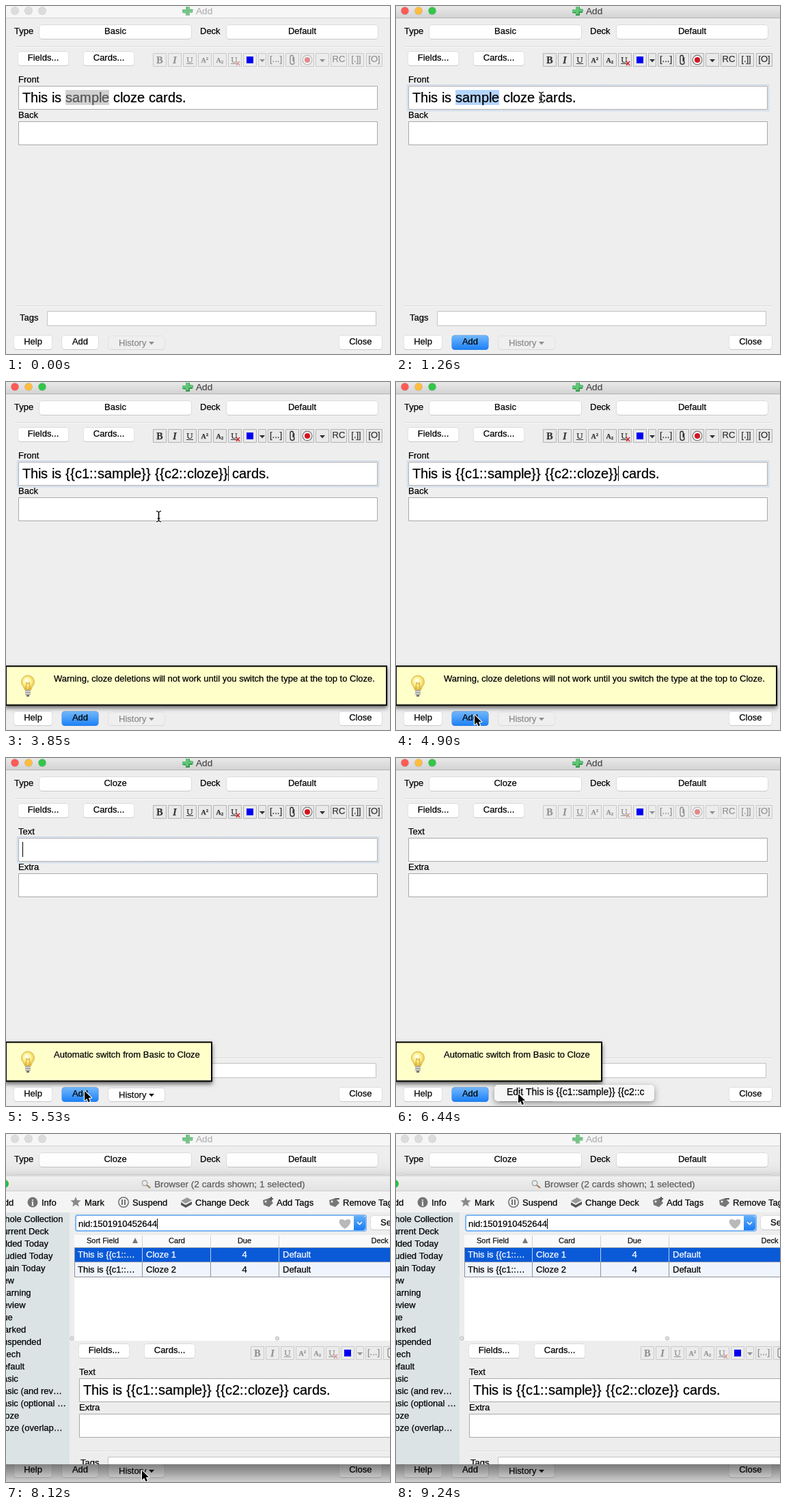
Animation, 562 px wide and 510 px high, one loop 9310 ms. Source, as an HTML page with a canvas:

```html
<!DOCTYPE html>
<html lang="en">
<head>
<meta charset="utf-8">
<title>Add cloze cards</title>
<style>
html, body { margin: 0; width: 100%; height: 100%; overflow: hidden; background: #eee; }
canvas { display: block; width: 562px; height: 510px; }
</style>
</head>
<body>
<canvas id="stage"></canvas>
<script>
const W = 562, H = 510, LOOP = 9310, STEP = 70;
const SANS = '"Liberation Sans", Arial, sans-serif';
const SERIF = '"Liberation Serif", serif';
const canvas = document.getElementById('stage');
const c = canvas.getContext('2d');
const ratio = window.devicePixelRatio || 1;
canvas.width = W * ratio;
canvas.height = H * ratio;

// Moments of the story, in ms
const T = {
  active: 490, cloze1: 2100, pick: 2730, cloze2: 3150, added: 5040,
  menu: 6160, menuEnd: 6650, browser: 7000, loaded: 7350, tipEnd: 8050, leave: 8890
};
const POINTER = [
  [0, 212, 134], [2310, 212, 134], [2660, 243, 134], [3150, 243, 134],
  [3780, 223, 197], [4060, 223, 197], [4830, 115, 488], [5740, 115, 488],
  [6090, 179, 492], [6440, 179, 492], [6650, 199, 493], [8680, 199, 493], [8890, 206, 512]
];

function pointerAt(t) {
  for (let i = 1; i < POINTER.length; i++) {
    const [t0, x0, y0] = POINTER[i - 1], [t1, x1, y1] = POINTER[i];
    if (t < t1) {
      const p = (t - t0) / (t1 - t0), e = p * p * (3 - 2 * p);
      return [x0 + (x1 - x0) * e, y0 + (y1 - y0) * e];
    }
  }
  return POINTER[POINTER.length - 1].slice(1);
}

// Drawing helpers
function rect(x, y, w, h, fill) {
  c.fillStyle = fill;
  c.fillRect(x, y, w, h);
}
function box(x, y, w, h, fill, line) {
  rect(x, y, w, h, fill);
  c.strokeStyle = line;
  c.lineWidth = 1;
  c.strokeRect(x + .5, y + .5, w - 1, h - 1);
}
function rounded(x, y, w, h, r, fill) {
  c.beginPath();
  c.roundRect(x, y, w, h, r);
  c.fillStyle = fill;
  c.fill();
}
function disc(x, y, r, fill) {
  c.beginPath();
  c.arc(x, y, r, 0, 7);
  c.fillStyle = fill;
  c.fill();
}
function poly(points, fill, line, width = 1) {
  c.beginPath();
  for (let i = 0; i < points.length; i += 2) c.lineTo(points[i], points[i + 1]);
  if (fill) { c.closePath(); c.fillStyle = fill; c.fill(); }
  if (line) { c.strokeStyle = line; c.lineWidth = width; c.stroke(); }
}
// A hairline outline gives the slightly heavy look of smoothed type
function text(s, x, y, color = '#000', size = 13, align = 'left', font = SANS, style = '') {
  c.font = `${style} ${size}px ${font}`;
  c.textAlign = align;
  c.fillStyle = c.strokeStyle = color;
  c.lineWidth = .25;
  c.lineJoin = 'round';
  c.fillText(s, x, y);
  c.strokeText(s, x, y);
}
function vertical(y0, y1, a, b) {
  const g = c.createLinearGradient(0, y0, 0, y1);
  g.addColorStop(0, a);
  g.addColorStop(1, b);
  return g;
}
function shifted(x, y, draw) {
  c.save();
  c.translate(x, y);
  draw();
  c.restore();
}
function shadow(color, blur, y) {
  c.shadowColor = color;
  c.shadowBlur = blur * ratio;
  c.shadowOffsetY = y * ratio;
}
function down(x, y, color) {
  poly([x - 4, y - 2, x + 4, y - 2, x, y + 2.5], color);
}

function button(x, y, w, h, label, blue, color = '#000') {
  rounded(x - .5, y - .5, w + 1, h + 1.5, 4.5, blue ? '#2f7fdc' : '#c9c9c9');
  rounded(x, y, w, h, 4, blue ? vertical(y, y + h, '#72b7fa', '#1e82f8') : '#fff');
  if (label) text(label, x + w / 2, y + 13, color, 13, 'center');
}

function plusIcon(dim) {
  c.globalAlpha = dim ? .55 : 1;
  poly([263, 1, 269, 1, 269, 4, 274, 5, 273, 10, 269, 10, 269, 14, 263, 14, 263, 11, 258, 10, 258, 5, 263, 5], '#2f9a48');
  poly([263, 1, 268, 1, 268, 5, 273, 5, 273, 8, 268, 8, 267, 12, 263, 12, 263, 9, 258, 9, 258, 5, 263, 5], '#62c47a');
  c.globalAlpha = 1;
}

function titleBar(active) {
  rect(0, 0, W, 17, active ? vertical(0, 17, '#e9e9e9', '#d3d3d3') : '#f6f6f6');
  rect(0, 17, W, 1, active ? '#b4b4b4' : '#d4d4d4');
  ['#fc5b57', '#fdbc40', '#34c649'].forEach((color, i) => {
    disc(13 + 20 * i, 7, 6, active ? 'rgba(0,0,0,.16)' : '#cfcfcf');
    disc(13 + 20 * i, 7, 5.5, active ? color : '#dcdcdc');
  });
  plusIcon(!active);
  text('Add', 278, 12, active ? '#4a4a4a' : '#b2b2b2', 13.6);
}

function formatBar(enabled) {
  const ink = enabled ? '#333' : '#929292';
  const edges = [215, 20, 237, 20, 259, 20, 281, 20, 303, 20, 325, 20, 347, 20, 369, 12,
    383, 24, 409, 20, 431, 20, 453, 20, 475, 24, 501, 23, 527, 24];
  for (let i = 0; i < edges.length; i += 2)
    box(edges[i], 69, edges[i + 1], 20, enabled ? '#e9e9e9' : '#ececec', enabled ? '#b3b3b3' : '#cacaca');
  const serif = (s, x, y, size, style) => text(s, x, y, ink, size, 'center', SERIF, style);
  serif('B', 225, 84, 14, 'bold');
  serif('I', 247, 84, 14, 'italic bold');
  serif('U', 269, 83, 13, '');
  rect(264, 84, 10, 1, ink);
  serif('A', 289, 83, 10, 'bold');
  serif('2', 294.5, 79, 7, 'bold');
  serif('A', 311, 83, 10, 'bold');
  serif('2', 316.5, 84, 7, 'bold');
  serif('U', 334, 83, 13, '');
  rect(329, 84, 9, 1, ink);
  const red = enabled ? '#d3232b' : '#dc9a9c';
  poly([337, 81, 342, 87], null, red, 1.5);
  poly([342, 81, 337, 87], null, red, 1.5);
  rect(352, 74, 10, 10, '#0000f0');
  down(375, 80, ink);
  text('[...]', 395, 82, ink, 13, 'center');
  c.strokeStyle = ink;
  c.lineWidth = 1.4;
  c.beginPath();
  c.moveTo(421.5, 75);
  c.lineTo(421.5, 82);
  c.arc(419, 82.5, 3, 0, Math.PI);
  c.lineTo(416, 75);
  c.arc(418.2, 74.5, 2.2, Math.PI, 0);
  c.lineTo(420, 81);
  c.stroke();
  disc(441, 79, 7.5, enabled ? '#777' : '#bbb');
  disc(441, 79, 6.3, '#f2f2f2');
  disc(441, 79, 4, enabled ? '#d4141c' : '#e08a8c');
  down(463, 80, ink);
  text('RC', 487, 82, ink, 13, 'center');
  text('[.]]', 512.5, 82, ink, 13, 'center');
  text('[O]', 539, 82, ink, 13, 'center');
}

function fields(names, width, focus) {
  button(17.5, 67, 74, 20, 'Fields...');
  button(113.5, 67, 74, 20, 'Cards...');
  text(names[0], 18, 112);
  text(names[1], 18, 164);
  box(18, 117, width, 35, '#fff', '#a9a9a9');
  box(18, 169, width, 35, '#fff', '#a9a9a9');
  if (focus) {
    c.strokeStyle = '#a9c9ec';
    c.lineWidth = 1;
    c.setLineDash([2, 1]);
    c.strokeRect(16.5, 115.5, width + 3, 38);
    c.setLineDash([]);
  }
}

// The editor sets its type on whole-pixel advances
function advance(s) {
  c.font = `20px ${SANS}`;
  return [...s].reduce((sum, ch) => sum + Math.round(c.measureText(ch).width), 0);
}
function largeText(s, x, color = '#000') {
  for (const ch of s) {
    text(ch, x, 141, color, 20);
    x += advance(ch);
  }
}

// Field content as [before, selected, after]; an empty selection is a caret
function content(t) {
  if (t >= T.added) return ['', '', ''];
  if (t >= T.cloze2) return ['This is {{c1::sample}} {{c2::cloze}}', '', ' cards.'];
  if (t >= T.pick) return ['This is {{c1::sample}} ', 'cloze', ' cards.'];
  if (t >= T.cloze1) return ['This is {{c1::sample}}', '', ' cloze cards.'];
  return ['This is ', 'sample', ' cloze cards.'];
}

function fieldText(t, focus) {
  const [before, picked, after] = content(t);
  const x = 24 + advance(before), w = advance(picked);
  if (picked) rect(x, 123, w, 22, focus ? '#b4d5fe' : '#d2d2d2');
  largeText(before, 24);
  largeText(picked, x, focus ? '#000' : '#555');
  largeText(after, x + w);
  if (focus && !picked) rect(x, 123, 1, 22, '#000');
}

function bulb() {
  const g = c.createRadialGradient(30, 437, 1, 32, 440, 11);
  g.addColorStop(0, '#fffef0');
  g.addColorStop(.5, '#fdf08a');
  g.addColorStop(1, '#e3b93c');
  c.beginPath();
  c.arc(32, 439.5, 9.5, .75 * Math.PI, .25 * Math.PI);
  c.lineTo(36, 452);
  c.lineTo(28, 452);
  c.closePath();
  c.fillStyle = g;
  c.fill();
  c.strokeStyle = '#d5b04a';
  c.lineWidth = .8;
  c.stroke();
  poly([29, 450, 30, 440, 32, 443, 34, 440, 35, 450], null, '#cf9a2d', .9);
  rounded(28, 451, 8, 8, 2, '#a9a9a0');
  rect(28, 453, 8, 1, '#e4e4da');
  rect(28, 456, 8, 1, '#e4e4da');
  rect(30, 459, 4, 2, '#666');
}

function tooltip(right, message) {
  c.save();
  shadow('rgba(0,0,0,.55)', 6, 3);
  rect(-2, 415.5, right + 2, 59, '#000');
  c.restore();
  rect(1, 417.5, right - 3, 55, '#ffffca');
  bulb();
  text(message, 70, 439);
}

function addWindow(t) {
  const active = t >= T.active && t < T.browser;
  const focus = active && t < T.menu;
  const cloze = t >= T.added;
  rect(0, 0, W, H, '#eee');
  titleBar(active);
  text('Type', 12, 41);
  button(49, 28, 222, 20, cloze ? 'Cloze' : 'Basic');
  text('Deck', 284, 41);
  button(323, 28, 221, 20, 'Default');
  rect(12, 59, 539, 1, '#dcdcdc');
  rect(12, 60, 539, 1, '#fafafa');
  formatBar(focus);
  fields(cloze ? ['Text', 'Extra'] : ['Front', 'Back'], 526, focus);
  fieldText(t, focus);
  rect(12, 439, 539, 1, '#dcdcdc');
  rect(12, 440, 539, 1, '#fafafa');
  text('Tags', 20, 461);
  box(60, 447, 482, 22, '#fff', '#c4c4c4');
  button(11.5, 483, 56, 20, 'Help');
  button(82, 483, 53, 20, 'Add', active);
  const ink = cloze ? '#111' : '#8c8c8c';
  c.globalAlpha = cloze ? 1 : .6;
  button(150, 484, 82, 19);
  c.globalAlpha = 1;
  text('History', 165, 498, ink);
  down(213, 494, ink);
  button(487.5, 483, 62.5, 20, 'Close');
}

function historyMenu() {
  c.save();
  shadow('rgba(0,0,0,.4)', 10, 3);
  rounded(144, 479, 234, 24, 5, '#f7f7f7');
  c.restore();
  text('Edit This is {{c1::sample}} {{c2::c', 162, 494, '#000', 14);
}

function browserIcons() {
  const gray = '#747474';
  disc(39, 100, 7.5, gray);
  text('i', 39, 105, '#fff', 12, 'center', SERIF, 'bold');
  const star = [];
  for (let i = 0; i < 10; i++) {
    const r = i % 2 ? 3.6 : 8, a = i * Math.PI / 5 - Math.PI / 2;
    star.push(102 + r * Math.cos(a), 100 + r * Math.sin(a));
  }
  poly(star, '#8a8a8a');
  disc(172, 100, 8, gray);
  disc(172, 100, 6.5, '#f4f4f4');
  rect(169, 96, 2, 8, gray);
  rect(173, 96, 2, 8, gray);
  poly([256, 98, 265, 93, 272, 97, 263, 102], '#999');
  poly([256, 100, 263, 104, 272, 99, 272, 103, 263, 108, 256, 104], '#555');
  for (const x of [383, 480]) {
    poly([x - 7, 97, x + 2, 94, x + 8, 101, x + 2, 107, x - 6, 104], '#777');
    disc(x - 3, 99, 1.5, '#f4f4f4');
    rect(x + 2, 94, 6, 2, '#555');
  }
  rect(387, 92, 2, 6, '#555');
}

function sidebar(loaded) {
  rect(0, 115, 93, 369, '#dbe3e5');
  if (!loaded) {
    rect(79, 115, 14, 369, '#f4f4f4');
    rect(0, 472, 93, 12, '#f4f4f4');
  }
  const names = [loaded ? 'Whole Collection' : 'Whole Colle…', 'Current Deck', 'Added Today',
    'Studied Today', 'Again Today', 'New', 'Learning', 'Review', 'Due', 'Marked', 'Suspended',
    'Leech', 'Default', 'Basic', loaded ? 'Basic (and rev…' : 'Basic (and r…',
    loaded ? 'Basic (optional …' : 'Basic (optio…', 'Cloze', loaded ? 'Cloze (overlap…' : 'Cloze (over…'];
  names.forEach((name, i) => text(name, -14, 129 + 18 * i));
}

function searchRow() {
  rounded(101, 118, 427, 25, 4, '#7db6f4');
  rounded(103, 120, 423, 21, 2, '#fff');
  text('nid:1501910452644', 106, 136);
  rect(221, 124, 1, 15, '#000');
  c.beginPath();
  c.moveTo(496, 139);
  c.bezierCurveTo(486, 133, 486, 125, 491, 125);
  c.quadraticCurveTo(495, 125, 496, 127);
  c.quadraticCurveTo(497, 125, 501, 125);
  c.bezierCurveTo(506, 125, 506, 133, 496, 139);
  c.fillStyle = '#b9b9b9';
  c.fill();
  rounded(509, 120, 17, 21, [0, 4, 4, 0], vertical(120, 141, '#62aef9', '#1b7bf2'));
  poly([514, 129, 517.5, 132.5, 521, 129], null, '#fff', 1.6);
  button(534, 120, 60, 20);
  text('Se', 548, 134);
}

function table(bottom) {
  rect(100, 148, W, bottom - 148, '#fff');
  rect(100, 148, W, 18, '#fafafa');
  rect(100, 166, W, 1, '#a4a8b0');
  text('Sort Field', 118, 160, '#111', 11);
  poly([185, 160, 193, 160, 189, 152], '#777');
  text('Card', 250, 160, '#111', 11, 'center');
  text('Due', 349, 160, '#111', 11, 'center');
  text('Deck', 547, 160, '#111', 11, 'center');
  rect(100, 167, W, 20, '#0a5ad8');
  rect(100, 187, W, 1, '#7f8fae');
  rect(100, 188, W, 21, '#f0f4fc');
  rect(100, 209, W, 1, '#8d929c');
  rect(100, 167, 1, 43, '#8d929c');
  for (const x of [199, 299, 399]) {
    rect(x, 149, 1, 17, '#cfcfcf');
    rect(x, 167, 1, 20, '#b9d0f5');
    rect(x, 188, 1, 21, '#8d929c');
  }
  for (let i = 0; i < 2; i++) {
    const y = 181 + 22 * i, ink = i ? '#000' : '#fff';
    text('This is {{c1::…', 105, y, ink);
    text('Cloze ' + (i + 1), 205, y, ink);
    text('4', 349, y, ink, 13, 'center');
    text('Default', 405, y, ink);
  }
}

function handle(x) {
  disc(x, 299.5, 3, '#bdbdbd');
  disc(x, 299.5, 2, '#e2e2e2');
}

function browser(t) {
  const loaded = t >= T.loaded;
  c.save();
  shadow('rgba(0,0,0,.6)', 30, 14);
  rect(-60, 62, W + 120, 422, '#ededed');
  c.restore();
  c.save();
  c.beginPath();
  c.rect(0, 62, W, 422);
  c.clip();
  rect(0, 62, W, 22, vertical(62, 84, '#f0f0f0', '#e2e2e2'));
  rect(0, 83, W, 1, '#cfcfcf');
  disc(-2, 73, 6, '#25c13f');
  disc(203, 72, 4.5, '#a9a9a9');
  disc(203, 72, 3, '#e4eef4');
  poly([206, 75, 211, 79], null, '#a07a52', 2.2);
  text('Browser (2 cards shown; 1 selected)', 217, 78, '#5c5c5c', 13.65);
  rect(0, 84, W, 31, loaded ? '#f4f4f4' : '#fafafa');

  const labels = ['Add', 'Info', 'Mark', 'Suspend', 'Change Deck', 'Add Tags', 'Remove Tags', 'Delete'];
  const places = loaded ? [-12, 52, 115, 185, 277, 396, 493, 610] : [38, 86, 133, 187, 263, 366, 447, 553];
  labels.forEach((label, i) => text(label, places[i], loaded ? 105 : 101));
  if (loaded) browserIcons();

  sidebar(loaded);
  searchRow();
  table(loaded ? 303 : 484);
  handle(96.5);
  if (loaded) {
    handle(397);
    shifted(143, 242, () => formatBar(false));
    shifted(89, 241, () => {
      fields(['Text', 'Extra'], 560, false);
      largeText('This is {{c1::sample}} {{c2::cloze}} cards.', 24);
    });
    rect(107, 464, W, 1, '#dedede');
    rect(107, 465, W, 1, '#f8f8f8');
    text('Tags', 109, 486);
    box(149, 473, 460, 22, '#fff', '#c4c4c4');
  }
  c.restore();
}

function pointer(t) {
  const [x, y] = pointerAt(t);
  const overField = (y > 117 && y < 152) || (y > 169 && y < 204);
  if (overField) {
    const cx = Math.round(x) + .5;
    for (const [color, w] of [['rgba(255,255,255,.8)', 3], ['#000', 1.3]]) {
      poly([cx - 3.5, y - 8, cx, y - 6.5, cx, y + 6.5, cx - 3.5, y + 8], null, color, w);
      poly([cx + 3.5, y - 8, cx, y - 6.5, cx, y + 6.5, cx + 3.5, y + 8], null, color, w);
      poly([cx - 2, y + 3, cx + 2, y + 3], null, color, w);
    }
    return;
  }
  shifted(x, y, () => {
    const arrow = [0, 0, 0, 14, 3.2, 11, 5.5, 16.3, 8, 15.2, 5.8, 10, 10, 10];
    c.lineJoin = 'round';
    poly([...arrow, 0, 0], null, '#fff', 2.2);
    poly(arrow, '#000');
  });
}

function draw(t) {
  c.setTransform(ratio, 0, 0, ratio, 0, 0);
  addWindow(t);
  if (t >= T.browser) browser(t);
  if (t >= T.cloze1 && t < T.added)
    tooltip(558, 'Warning, cloze deletions will not work until you switch the type at the top to Cloze.');
  if (t >= T.added && t < T.tipEnd) tooltip(302, 'Automatic switch from Basic to Cloze');
  if (t >= T.menu && t < T.menuEnd) historyMenu();
  if (t >= T.active && t < T.leave) pointer(t);
}

const start = performance.now();
function tick() {
  const ms = Math.max(0, performance.now() - start) % LOOP;
  const held = ms >= 5530 && ms < 5740;
  draw(held ? 5530 : Math.floor(ms / STEP) * STEP);
  requestAnimationFrame(tick);
}
tick();
</script>
</body>
</html>
```
